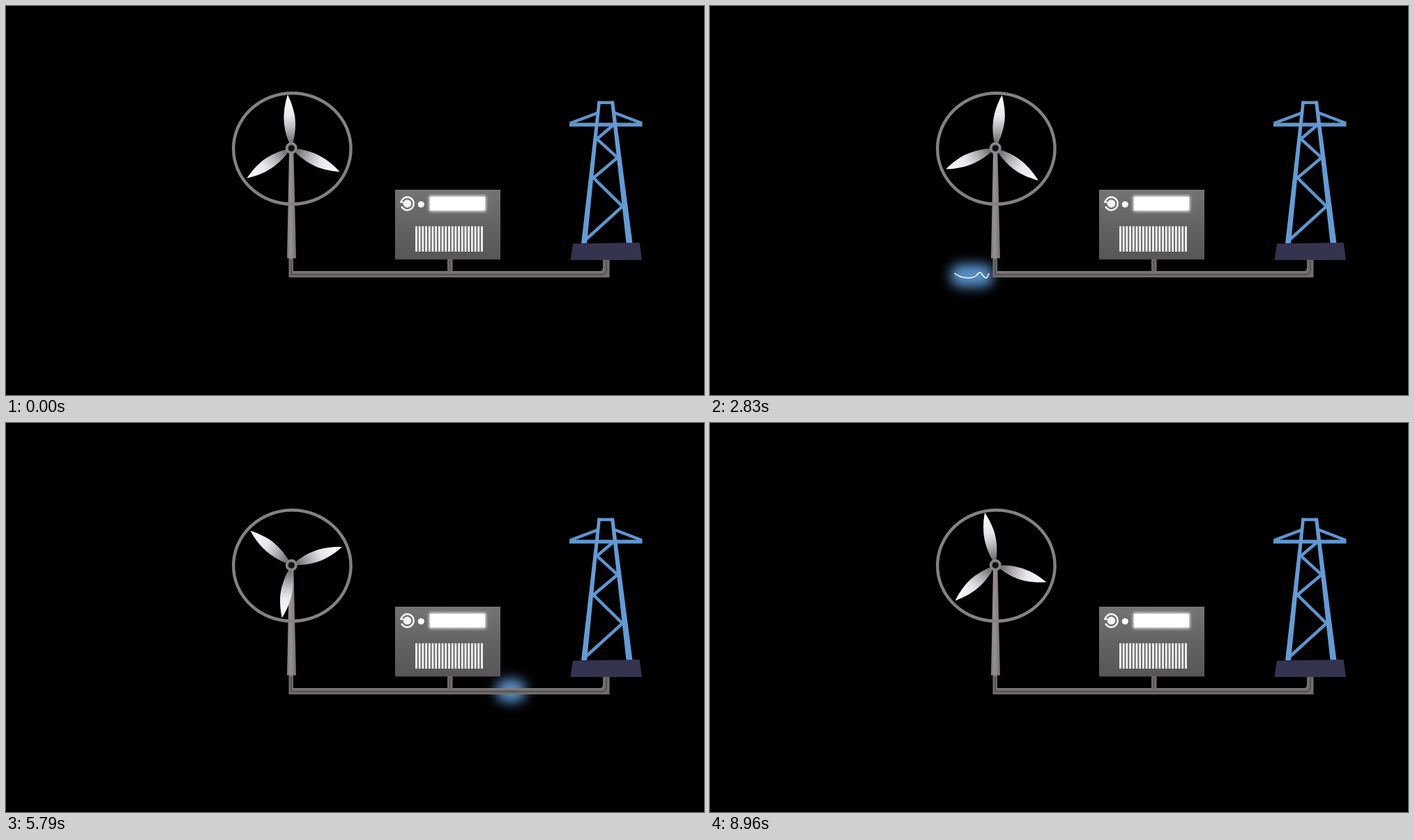
Animation of 1001x559 px, one loop 9 s. Source, as an HTML page:

```html
<!DOCTYPE html>
<html lang="en">
<head>
<meta charset="utf-8">
<title>Wind power</title>
<style>
  html, body { margin: 0; width: 100%; height: 100%; overflow: hidden; background: #000; }
  svg { display: block; width: 100%; height: 100%; }
</style>
</head>
<body>
<svg viewBox="0 0 1001 559" preserveAspectRatio="none">
  <defs>
    <radialGradient id="yellow">
      <stop offset="0" stop-color="#c9c020"/>
      <stop offset=".45" stop-color="#a09812" stop-opacity=".9"/>
      <stop offset=".75" stop-color="#625c08" stop-opacity=".4"/>
      <stop offset="1" stop-color="#332f00" stop-opacity="0"/>
    </radialGradient>
    <linearGradient id="blade" gradientUnits="userSpaceOnUse" x1="3" y1="-8" x2="-3" y2="-77">
      <stop offset="0" stop-color="#6f6c70"/>
      <stop offset=".3" stop-color="#b8b5ba"/>
      <stop offset=".55" stop-color="#e8e6ec"/>
      <stop offset="1" stop-color="#fff"/>
    </linearGradient>
    <linearGradient id="mast">
      <stop offset="0" stop-color="#7c797a"/>
      <stop offset=".4" stop-color="#969294"/>
      <stop offset="1" stop-color="#737072"/>
    </linearGradient>
    <linearGradient id="case" x2="0" y2="1">
      <stop offset="0" stop-color="#757475"/>
      <stop offset=".5" stop-color="#646264"/>
      <stop offset="1" stop-color="#585558"/>
    </linearGradient>
    <filter id="soft" x="-20%" y="-50%" width="140%" height="200%">
      <feGaussianBlur stdDeviation="2"/>
    </filter>
    <filter id="haze" x="-60%" y="-120%" width="220%" height="340%">
      <feGaussianBlur stdDeviation="8.500"/>
    </filter>
  </defs>

  <g id="wind" fill="#8edcff"></g>

  <g id="charge">
    <rect id="halo" height="32" y="-16" rx="14" fill="#5b95d0" filter="url(#haze)"/>
    <path id="bolt" d="M-29 -3.500Q-20 3 -10 4Q2 5 8 0Q13 -8 17 -3Q22 5 25 4Q27 3 29 -3"
      fill="none" stroke="#fff" stroke-width="1.800" stroke-linecap="round"/>
  </g>
  <g id="boxSparks"></g>
  <g id="towerSparks"></g>

  <path d="M405.500 362H412V381H633V364H640.500V381H856V364.500H865.500V390H405.500Z" fill="#726e6d"/>
  <path d="M409 364V386H855Q861 386 861 379V366M636.500 366V381" fill="none" stroke="#5a5656" stroke-width="2.400"/>
  <path d="M412 382H633M640 382H852Q856 382 856.500 377" fill="none" stroke="#858180" stroke-width="1.400"/>

  <path d="M406 211H412.500L416 362.500H403Z" fill="url(#mast)"/>
  <ellipse cx="410.400" cy="205" rx="84.200" ry="79.700" fill="none" stroke="#82827f" stroke-width="4.400"/>
  <g id="rotor" fill="url(#blade)"></g>
  <circle cx="409.300" cy="204.300" r="6.700" fill="#29292d" stroke="#89878a" stroke-width="3.600"/>
  <circle cx="409.300" cy="204.300" r="3.600" fill="#111"/>

  <rect x="558" y="264" width="151" height="100.300" fill="url(#case)"/>
  <circle cx="575.500" cy="284" r="9.300" fill="none" stroke="#f4f4f4" stroke-width="2.600"
    stroke-dasharray="51 7.400" transform="rotate(197 575.500 284)"/>
  <circle cx="575.500" cy="284" r="5.800" fill="#f4f4f4"/>
  <path d="M565 281.500L573 283" stroke="#f4f4f4" stroke-width="2"/>
  <circle cx="595.300" cy="285" r="4.600" fill="#fbfbf7"/>
  <rect x="607" y="273" width="81" height="22" fill="#fff" filter="url(#soft)"/>
  <rect x="608" y="274.500" width="79" height="19" fill="#fff"/>
  <g id="vents" fill="#f1f0f3"></g>

  <g fill="none" stroke="#5f95ce" stroke-width="4.400">
    <path d="M871 171L847.500 191L877 218L842.500 247L884 288L829 338"/>
    <path d="M809 168.500L849 153.500M912 168.500L873 153.500"/>
    <path d="M808 170.500H912.500" stroke-width="5.400"/>
    <path d="M848.500 138.800H872"/>
  </g>
  <path d="M848.500 136.700H853L833 341H825ZM867 136.700H872L898.500 341H889.500Z" fill="#659bd3"/>
  <path d="M813 341.500L908.500 340L912 365H809.500Z" fill="#34344f"/>
</svg>
<script>
const LOOP = 9000, GUST = 2926;
const $ = id => document.getElementById(id);
const clamp = v => Math.max(0, Math.min(1, v));
const smoothstep = v => v * v * (3 - 2 * v);
// Visible from a to b, with soft ends
const pulse = (t, a, b, soft = 200) => clamp((t - a) / soft) * clamp((b - t) / soft);

function set(id, attrs) {
  for (const k in attrs) $(id).setAttribute(k, attrs[k]);
}

// Each ribbon: centre line, half width along it, and when it unrolls
const bulge = size => u => size * Math.sqrt(Math.sin(Math.PI * u));
const ribbons = [
  {
    line: '64,246 52,275 64,299 90,300 148,253 200,225 240,232 271,274 253,312 220,317',
    half: u => 10.3 * Math.min(1, u / .22) ** .7,
    delay: 0, speed: 1
  },
  {
    line: '62,264 75,281 95,277 130,244 165,216 200,203 232,207 253,222',
    half: bulge(4.7), delay: .33, speed: 2.2
  },
  {
    line: '44,297 54,314 78,322 108,314 148,276 182,249 205,244 242,260',
    half: bulge(4.4), delay: .18, speed: 1.38
  }
];
for (const r of ribbons) r.line = r.line.split(' ').map(p => p.split(',').map(Number));

// Catmull-Rom point at u = 0..1
function along(line, u) {
  const last = line.length - 1, s = u * last;
  const i = Math.min(last - 1, Math.floor(s)), k = s - i;
  const b = line[i], c = line[i + 1], a = line[i - 1] || b, d = line[i + 2] || c;
  return [0, 1].map(j => b[j] + k / 2 * (c[j] - a[j]
    + k * (2 * a[j] - 5 * b[j] + 4 * c[j] - d[j]
    + k * (3 * (b[j] - c[j]) + d[j] - a[j]))));
}

function ribbonPath({ line, half }, end) {
  const steps = 70, left = [], right = [];
  for (let i = 0; i <= steps; i++) {
    const u = end * i / steps;
    const [x, y] = along(line, u);
    const [x0, y0] = along(line, Math.max(0, u - .004));
    const [x1, y1] = along(line, Math.min(1, u + .004));
    const w = half(Math.min(u, 1)) / (Math.hypot(x1 - x0, y1 - y0) || 1);
    const nx = (y0 - y1) * w || 0, ny = (x1 - x0) * w || 0;
    left.push([x + nx, y + ny]);
    right.unshift([x - nx, y - ny]);
  }
  return `M${left.concat(right).join('L')}Z`;
}

$('wind').innerHTML = ribbons.map((_, i) => `<path id="ribbon${i}"/>`).join('');

$('rotor').innerHTML = [0, 120, 240].map(a =>
  `<path d="M-2.500 -8C-7 -20 -9 -36 -7 -50C-5.500 -61 -2.500 -70 0.300 -77C3 -70 6.500 -60 8 -48C9.500 -34 7 -20 3 -8Z"
    transform="rotate(${a})"/>`).join('');

$('vents').innerHTML = Array.from({ length: 21 }, (_, i) =>
  `<rect x="${587 + i * 4.7}" y="316.500" width="2.900" height="36.500"/>`).join('');

const zigs = ['M3 -8Q-4 -5 -4 -3L-1 4L9 8L12 11L20 14', 'M6 -9L-1 -5L-3 4L0 13', 'M2 -6L3 0L-4 5L-7 12'];
function sparks(id, spots) {
  $(id).innerHTML = spots.map(([x, y], i) =>
    `<g transform="translate(${x} ${y})"><circle r="30" fill="url(#yellow)"/>
     <path d="${zigs[i]}" fill="none" stroke="#fff" stroke-width="1.700" stroke-linecap="round"/></g>`).join('');
}
sparks('boxSparks', [[533, 246], [637, 247], [713, 246]]);
sparks('towerSparks', [[793, 136], [860, 122], [937, 138]]);

// Unrolls fast, lingers, then runs out to the tip
function unroll(phase) {
  const d = 2 * clamp((phase - 480) / 1670) - 1;
  return .6 + d ** 3 * (d < 0 ? .6 : .4);
}

function drawWind(phase) {
  const p = unroll(phase);
  ribbons.forEach((r, i) => {
    const end = clamp((p - r.delay) * r.speed);
    set('ribbon' + i, { d: end ? ribbonPath(r, end) : '' });
  });
  set('wind', { opacity: clamp((2480 - phase) / 340) });
}

function drawCharge(t) {
  const q = clamp((t - 2300) / 5100);
  const x = 361 + 475 * smoothstep(q);
  const half = 36 - 18 * Math.sin(Math.PI * q);
  set('halo', { x: -half, width: 2 * half });
  set('bolt', { transform: `scale(${half / 36})` });
  set('charge', {
    transform: `translate(${x} ${388.5 - 4 * clamp(3 * q)})`,
    opacity: pulse(t, 1550, 7400)
  });
}

function draw(t) {
  drawWind(t % GUST);
  drawCharge(t);

  // Fourteen thirds of a turn per loop, lagging in the middle
  const lap = t / LOOP;
  const angle = 1680 * lap - 64 * Math.sin(Math.PI * lap) ** 3 - 4.4;
  set('rotor', { transform: `translate(409.300 204.300) rotate(${angle})` });

  set('boxSparks', { opacity: pulse(t, 4500, 5600) });
  set('towerSparks', { opacity: pulse(t, 6900, 7900) });
}

const start = performance.now();
function tick() {
  draw((performance.now() - start) % LOOP);
  requestAnimationFrame(tick);
}
tick();
</script>
</body>
</html>
```
